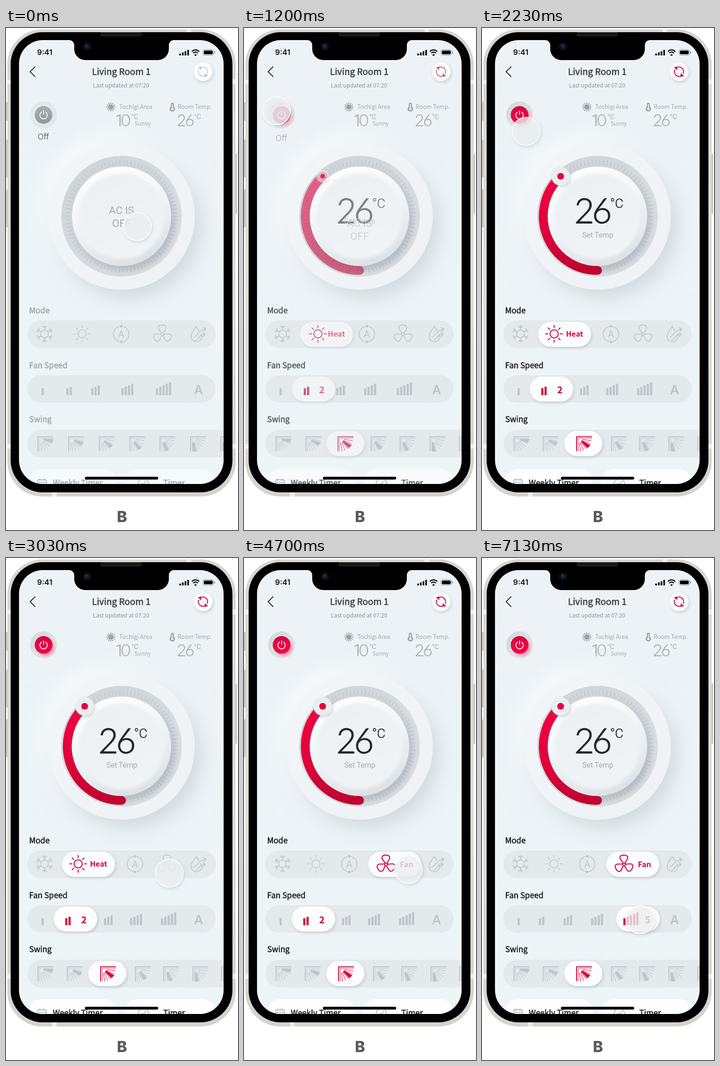
Write an HTML page that moves like this. It is 500 by 1080 pixels and loops after 8000 ms.

```html
<!DOCTYPE html>
<html lang="en">
<head>
<meta charset="utf-8">
<title>AC remote</title>
<style>
/* Switch states, each going from 0 to 1 */
@property --on { syntax: '<number>'; inherits: true; initial-value: 0; }
@property --fan { syntax: '<number>'; inherits: true; initial-value: 0; }
@property --five { syntax: '<number>'; inherits: true; initial-value: 0; }

html, body { margin: 0; width: 100%; height: 100%; overflow: hidden; background: #fff; }
svg { display: block; width: 100vw; height: 100vh;
  animation: on 8s ease-in-out infinite, fan 8s ease-in-out infinite, five 8s ease-in-out infinite; }
text { font-family: 'Noto Sans CJK JP', 'Noto Sans CJK SC', 'Noto Sans CJK', 'Noto Sans', sans-serif; }
.mid { text-anchor: middle; }
.roboto { font-family: Roboto, sans-serif; }
.light { font-weight: 300; }
.inter { font-family: Inter, sans-serif; }
.digits { font-family: Lato, sans-serif; font-weight: 300; }
.head { font-size: 17px; font-weight: 500; stroke-width: .55px;
  color: color-mix(in srgb, #1a1c1e calc(var(--on) * 100%), #a0a5a9); fill: currentColor; stroke: currentColor; }
.pick { font-size: 16px; font-weight: 700; fill: #d2033b; }
.info { fill: #a4a8ac; font-size: 12.5px; }

@keyframes on { 0%, 10.375% { --on: 0; } 19.125%, 100% { --on: 1; } }
@keyframes fan { 0%, 50.375% { --fan: 0; } 58.75%, 100% { --fan: 1; } }
@keyframes five { 0%, 82.5% { --five: 0; } 89.125%, 100% { --five: 1; } }

.show { opacity: var(--on); }
.hide { opacity: calc(1 - var(--on)); }
.mode { --s: var(--fan); }
.speed { --s: var(--five); }
.swing { --s: 0; }
/* x goes from a (off) to b (on) to c (second choice) */
.move { transform: translateX(calc((var(--a) + (var(--b) - var(--a)) * var(--on) + (var(--c) - var(--b)) * var(--s)) * 1px)); }
.tint { color: color-mix(in srgb, #d2033b calc(var(--k, 0) * 100%), #bdc5c9); }
.first { --k: calc(var(--on) * (1 - var(--s))); }
.second { --k: var(--s); }
.fade { opacity: var(--k); }
.line { fill: none; stroke: currentColor; stroke-width: calc(1.6px + .5px * var(--k, 0)); stroke-linecap: round; stroke-linejoin: round; }
.solid { fill: currentColor; }
.card { opacity: calc(.45 + .55 * var(--on)); }
.off { transform: translateY(calc(var(--on) * 7px)); }
.idle { transform: translateY(calc(var(--on) * 50px)); }
.set { transform: translateY(calc((var(--on) - 1) * 68px)); }
.handle { transform: translate(169.5px, 319px) scale(calc(.3 + .7 * var(--on))); }

.dim { animation: dim 8s linear infinite; }
@keyframes dim { 0%, 75.375% { opacity: 1; } 76.25%, 82.5% { opacity: .5; } 89.125%, 100% { opacity: 1; } }

.touch { animation: touch 8s cubic-bezier(.8, 0, .2, 1) infinite; }
@keyframes touch {
  0%, .375% { transform: translate(283px, 427px); }
  7.5%, 25% { transform: translate(70px, 178px); }
  34.125%, 41.625% { transform: translate(352px, 678px); opacity: 1; }
  46.625% { transform: translate(352px, 678px); opacity: 0; }
  50.375% { transform: translate(354px, 670px); opacity: 0; }
  58.75%, 66.625% { transform: translate(354px, 670px); opacity: 1; }
  72.875%, 75.375% { transform: translate(341px, 778px); opacity: 1; }
  76.25%, 82.5% { transform: translate(341px, 778px); opacity: 0; }
  89.125%, 100% { transform: translate(341px, 778px); opacity: 1; }
}
</style>
</head>
<body>
<svg viewBox="0 0 500 1080">
  <defs>
    <linearGradient id="metal" x2="0" y2="1"><stop stop-color="#d8d5d1"/><stop offset=".5" stop-color="#dfdcd7"/><stop offset="1" stop-color="#d6d2cb"/></linearGradient>
    <linearGradient id="screen" x2="0" y2="1"><stop stop-color="#ecf2f6"/><stop offset="1" stop-color="#edf5f7"/></linearGradient>
    <linearGradient id="disc" x2="1" y2="1"><stop stop-color="#f3f6f8"/><stop offset="1" stop-color="#eff2f4"/></linearGradient>
    <linearGradient id="track" x2="1" y2="1"><stop stop-color="#ccd2d6"/><stop offset="1" stop-color="#dee2e5"/></linearGradient>
    <linearGradient id="knob" x1=".3" x2=".7" y2="1"><stop stop-color="#fdfefe"/><stop offset=".5" stop-color="#f0f3f5"/><stop offset="1" stop-color="#dae0e4"/></linearGradient>
    <linearGradient id="face" x1=".3" x2=".7" y2="1"><stop stop-color="#ecf0f2"/><stop offset="1" stop-color="#f1f4f6"/></linearGradient>
    <linearGradient id="socket" x2="1" y2="1"><stop stop-color="#d0d6da"/><stop offset="1" stop-color="#e6eaed"/></linearGradient>
    <linearGradient id="arc" x2="0" y2="1"><stop stop-color="#f0003f"/><stop offset=".6" stop-color="#e0033d"/><stop offset="1" stop-color="#c0032f"/></linearGradient>
    <linearGradient id="gray" x2="0" y2="1"><stop stop-color="#a9adb0"/><stop offset="1" stop-color="#94999c"/></linearGradient>
    <linearGradient id="red" x2="0" y2="1"><stop stop-color="#d8043b"/><stop offset="1" stop-color="#f4064a"/></linearGradient>
    <filter id="soft" x="-30%" y="-30%" width="160%" height="160%"><feGaussianBlur stdDeviation="20"/></filter>
    <filter id="blur" x="-30%" y="-30%" width="160%" height="160%"><feGaussianBlur stdDeviation="8"/></filter>
    <filter id="edge"><feGaussianBlur stdDeviation="3"/></filter>
    <filter id="lift" x="-30%" y="-30%" width="160%" height="180%"><feDropShadow dx="2" dy="3" stdDeviation="3" flood-color="#8e9aa4" flood-opacity=".4"/></filter>
    <clipPath id="view"><rect x="28" y="26" width="441" height="955" rx="51"/></clipPath>
    <clipPath id="ring"><circle cx="249" cy="405" r="130"/></clipPath>
  </defs>

  <!-- Phone body -->
  <g fill="#c9c5bf">
    <rect y="159" width="6" height="41" rx="2"/><rect y="240" width="6" height="82" rx="2"/>
    <rect y="347" width="6" height="82" rx="2"/><rect x="492" y="270" width="6" height="130" rx="2"/>
  </g>
  <rect x="3" y="3" width="492" height="1005" rx="75" fill="url(#metal)"/>
  <path d="M3 116h8M3 900h8M487 116h8M487 900h8M104 998v10M394 3v7" stroke="#f1efec" stroke-width="10"/>
  <rect x="10" y="9" width="478" height="990" rx="69"/>
  <rect x="28" y="26" width="441" height="955" rx="51" fill="url(#screen)"/>

  <g clip-path="url(#view)">
    <!-- Status bar -->
    <path d="M136 24v2a11 11 0 0 1 11 11v8a24 24 0 0 0 24 24h156a24 24 0 0 0 24-24v-8a11 11 0 0 1 11-11v-2z"/>
    <text class="inter" x="67" y="58" font-size="16.3" font-weight="600" fill="#111">9:41</text>
    <path d="M375.200 59v-4M381 59v-6.500M386.700 59v-9M392.500 59v-12" stroke="#111" stroke-width="3.600"/>
    <g fill="none" stroke="#111" stroke-width="2.600">
      <path d="M400.500 50.500q8-7 16 0M403.500 54q5-4.500 10 0"/><path d="M406.500 57.200l2 1.500 2-1.500"/>
    </g>
    <rect x="424.500" y="46.500" width="23" height="12" rx="3.500" fill="none" stroke="#8c9092"/>
    <rect x="426.500" y="48.500" width="19" height="8" rx="2"/><path d="M449.500 50.500v4" stroke="#8c9092" stroke-width="2"/>

    <!-- Header -->
    <path d="M63 83L52 94l11 11" fill="none" stroke="#333638" stroke-width="2.200"/>
    <text class="mid" x="248.500" y="101" font-size="19.300" font-weight="500" fill="#3a3d40" stroke="#3a3d40" stroke-width=".6">Living Room 1</text>
    <text class="mid" x="248" y="128" font-size="12.200" fill="#8d9195">Last updated at 07:20</text>
    <circle cx="425" cy="94" r="20" fill="#fdfdfe" filter="url(#lift)" opacity=".95"/>
    <g id="refresh" transform="translate(424.500 94)"></g>

    <!-- Power -->
    <circle cx="81" cy="187" r="29" fill="#e3e8eb"/>
    <circle cx="81" cy="187" r="29" fill="url(#socket)" class="show"/>
    <circle cx="86" cy="192" r="18" class="show" fill="#f58aa8" opacity=".5" filter="url(#edge)"/>
    <circle cx="81" cy="187" r="19" fill="url(#gray)"/>
    <circle cx="81" cy="187" r="19" fill="url(#red)" class="show"/>
    <path d="M76.500 181a8 8 0 1 0 9 0M81 178v8" fill="none" stroke="#fff" stroke-width="1.700" stroke-linecap="round"/>
    <g class="hide"><text class="inter mid off" x="80.500" y="239.500" font-size="17.500" font-weight="300" fill="#3f4346">Off</text></g>

    <!-- Weather -->
    <g id="weather" fill="#9ca1a5"></g>
    <path d="M358.500 164v9" stroke="#9ca1a5" stroke-width="6.500" stroke-linecap="round"/>
    <circle cx="358.500" cy="174" r="5.800" fill="#9ca1a5"/>
    <path d="M358.500 164v8" stroke="#eef3f6" stroke-width="2" stroke-linecap="round"/>
    <circle cx="358.500" cy="174" r="2.600" fill="#eef3f6"/>
    <g class="info">
      <text x="244" y="174">Tochigi Area</text><text x="370" y="174">Room Temp.</text>
      <text x="277" y="210" style="font-size:11.8px">Sunny</text>
      <g stroke="#a4a8ac" stroke-width=".4">
        <text class="roboto light" x="235" y="211" style="font-size:35px">1</text>
        <text class="digits" x="248" y="211" style="font-size:35px">0</text>
        <text class="digits" x="368" y="211" style="font-size:35px;letter-spacing:-2.5px">26</text>
      </g>
      <text class="roboto" x="270" y="196" style="font-size:15px">°C</text>
      <text class="roboto" x="405" y="196" style="font-size:15px">°C</text>
    </g>

    <!-- Dial -->
    <circle cx="232" cy="386" r="158" fill="#fff" opacity=".6" filter="url(#soft)"/>
    <circle cx="264" cy="424" r="155" fill="#b4bec5" opacity=".5" filter="url(#soft)"/>
    <circle cx="249" cy="405" r="158" fill="url(#disc)"/>
    <circle cx="249" cy="405" r="130" fill="url(#track)"/>
    <circle cx="249" cy="405" r="116" fill="none" stroke="#b0b9c0" stroke-width="10" pathLength="900" stroke-dasharray="1 9"/>
    <g clip-path="url(#ring)"><circle cx="256" cy="414" r="107" fill="#8795a1" opacity=".48" filter="url(#blur)"/></g>
    <path class="show" d="M249 521.500A116.500 116.500 0 0 1 170 319" fill="none" stroke="url(#arc)" stroke-width="19" stroke-linecap="round"/>
    <circle cx="249" cy="405" r="107" fill="url(#knob)"/>
    <circle cx="249" cy="405" r="92" fill="url(#face)" filter="url(#edge)"/>
    <g class="show"><g class="handle">
      <circle r="20" fill="#e9edf0" filter="url(#lift)"/><circle r="7.300" fill="#e5033e"/>
    </g></g>
    <g class="hide"><g class="mid idle" font-size="22.500" fill="#a6aaae">
      <text class="roboto" x="249" y="400">AC IS</text><text class="roboto" x="249" y="428">OFF</text>
    </g></g>
    <g class="show">
      <g fill="#25282a" stroke="#25282a">
        <text class="digits" x="199" y="420" font-size="74" letter-spacing="-5" stroke-width="1.300">26</text>
        <text class="roboto light" x="276" y="387" font-size="28" stroke-width=".5">°C</text>
      </g>
      <text class="roboto mid set" x="249.500" y="451" font-size="16" fill="#a6aaad">Set Temp</text>
    </g>

    <!-- Option rows -->
    <text class="head" x="50" y="614">Mode</text>
    <text class="head" x="50" y="731.500">Fan Speed</text>
    <text class="head" x="50" y="847.500">Swing</text>
    <g fill="#e4e9ec">
      <rect x="46" y="629" width="406" height="59.500" rx="29.700"/>
      <rect x="46" y="747" width="406" height="59" rx="29.500"/>
      <rect x="46" y="864.500" width="500" height="59.500" rx="29.700"/>
    </g>
    <g id="mode" class="mode"></g>
    <g id="speed" class="speed"></g>
    <g id="swing" class="swing"></g>

    <!-- Timer cards -->
    <g fill="#fdfefe" class="card">
      <rect x="50" y="949" width="189" height="60" rx="27"/><rect x="257" y="949" width="194" height="60" rx="27"/>
    </g>
    <g fill="none" stroke="#b6bec3" stroke-width="1.800">
      <rect x="68" y="972" width="19" height="17" rx="2"/><path d="M68 977.500h19M73 969v5M82 969v5"/>
      <circle cx="296" cy="980" r="11"/><path d="M292 979l4 3 6-8"/>
    </g>
    <text class="head" x="101" y="984.500">Weekly Timer</text>
    <text class="head" x="339" y="984.500">Timer</text>
    <rect x="170" y="965.500" width="158" height="6" rx="3"/>

    <!-- Touch point -->
    <g class="touch">
      <circle r="31" fill="#f1f4f5" fill-opacity=".72" filter="url(#lift)"/>
      <circle r="30.300" fill="none" stroke="#fff" stroke-opacity=".85" stroke-width="1.500"/>
    </g>
  </g>

  <rect x="204.500" y="9.500" width="88" height="8" rx="3" fill="#181818" stroke="#2c2c2c"/>
  <circle cx="174.500" cy="39.500" r="9" fill="#0b1018"/><circle cx="174.500" cy="39.500" r="4.500" fill="#10243a"/>
  <circle cx="173" cy="38" r="1.500" fill="#2a5379"/>
  <text class="inter mid" x="250" y="1063" font-size="33" font-weight="800" fill="#58595b">B</text>
</svg>

<script>
const $ = id => document.getElementById(id);
const times = (n, f) => Array.from({ length: n }, (_, i) => f(i)).join('');
const spin = (n, body) => times(n, i => `<g transform="rotate(${i * 360 / n})">${body}</g>`);
const line = d => `<path class="line" d="${d}"/>`;
const at = (a, b, c, y, cls, body) =>
  `<g class="move tint ${cls}" style="--a:${a};--b:${b};--c:${c}"><g transform="translate(0 ${y})">${body}</g></g>`;
const plate = (b, c, y, w, h) =>
  at(b, b, c, y, 'show', `<rect width="${w}" height="${h}" rx="${h / 2}" fill="#fcfdfe" filter="url(#lift)"/>`);

$('refresh').innerHTML = `<g class="tint" style="--k:var(--on)">${
  spin(2, line('M-6.500-7.600A10 10 0 0 1 9.400 3.400') + '<path class="solid" d="M-11-9.500L-3.500-11-4-3z"/>')}</g>`;

$('weather').innerHTML = `<g transform="translate(226 170)"><circle r="5.800"/>
  ${spin(12, '<path d="M-1.200-7L0-10.500 1.200-7z" stroke="#9ca1a5" stroke-width=".5"/>')}</g>`;

const snow = spin(6, line('M0-9V-18M-4.500-16.500L0-13 4.500-16.500M0-9L7.800-4.500'));
const sun = '<circle class="line" r="8.800"/>' + spin(8, line('M0-13.500V-18.200'));
const auto = line('M-4-16.300A16.800 16.800 0 0 0-4 16.300M4-16.300A16.800 16.800 0 0 1 4 16.300') +
  `<circle class="solid" cy="-16.800" r="2.600"/><circle class="solid" cy="16.800" r="2.600"/>
  <text class="solid inter mid" y="7.200" font-size="20">A</text>`;
const blades = spin(3, line('M-2-2.500C-4-8-11-12-8-17C-5-21 6-21 8-16C9-11 4-8 2.500-2.500')) + '<circle class="line" r="3"/>';
const drop = line('M-5-17C-10-9-16-4-16 4A11.500 11.500 0 0 0 7 5Q7 2 5-1M-5-17Q-2-12 1-8') +
  line('M-11 6C-4 6-2-8 15-11M10-14.500L16-11.500 12-6M-6 13C0 12 0 1 13 0M9-4L14.500 0 10 5');

$('mode').innerHTML = plate(121, 268, 632, 114, 54)
  + at(83, 83, 83, 658, '', snow)
  + at(164, 155.5, 155, 658, 'first', sun)
  + at(248.5, 278, 227, 658.5, '', auto)
  + at(337, 347, 306, 659, 'second', blades)
  + at(415, 415, 415, 659, '', drop)
  + at(180, 181, 181, 664, 'first fade', '<text class="pick">Heat</text>')
  + at(336, 336, 336, 664.5, 'second fade', '<text class="pick">Fan</text>');

const bars = n => times(n, i => {
  const h = 15 + 3.2 * i;
  return `<rect class="solid" x="${i * 7 - (n * 7 - 2.4) / 2}" y="${-h}" width="4.600" height="${h}"/>`;
});

$('speed').innerHTML = plate(103, 289.5, 750, 93.5, 53.5)
  + at(79, 79, 79, 790, '', bars(1))
  + at(136, 133.5, 128.5, 790, 'first', bars(2))
  + at(193, 220.5, 185, 790, '', bars(3))
  + at(261.5, 280.5, 248, 790, '', bars(4))
  + at(339.5, 350.5, 321, 790, 'second', `<g class="dim">${bars(5)}</g>`)
  + at(415, 415, 415, 788, '', '<text class="solid inter mid" font-size="27" font-weight="600">A</text>')
  + at(168, 168, 168, 786, 'first fade', '<text class="pick mid" style="font-size:20px">2</text>')
  + at(357, 357, 357, 786, 'second fade', '<text class="pick mid" style="font-size:20px">5</text>');

// Louver icon: corner frame, thin rays and one wide blade
const louver = bold => '<path d="M1 32V1H34" fill="none" stroke="currentColor" stroke-width="2"/>'
  + '<path d="M4.500 32V4.500H34" fill="none" stroke="currentColor" stroke-width=".8"/>'
  + times(6, i => {
    const blade = i === bold ? 'M8-1.500L29-4.500 27.500 4.500 8 1.500z' : 'M9-.5H28V.5H9z';
    return `<path class="solid" transform="translate(5 5) rotate(${10 + i * 14})" d="${blade}"/>`;
  });
const spots = [[68, 68], [134, 131], [203, 203], [266, 278], [331, 339], [397, 402], [462, 464]];
const swingX = ([a, b], i) => at(i === 2 ? 200 : a, b, b, 878.5, i === 2 ? 'first' : '', louver(Math.min(i, 5)));

$('swing').innerHTML = plate(177.5, 177.5, 867, 82, 54) + spots.map(swingX).join('');
</script>
</body>
</html>
```
